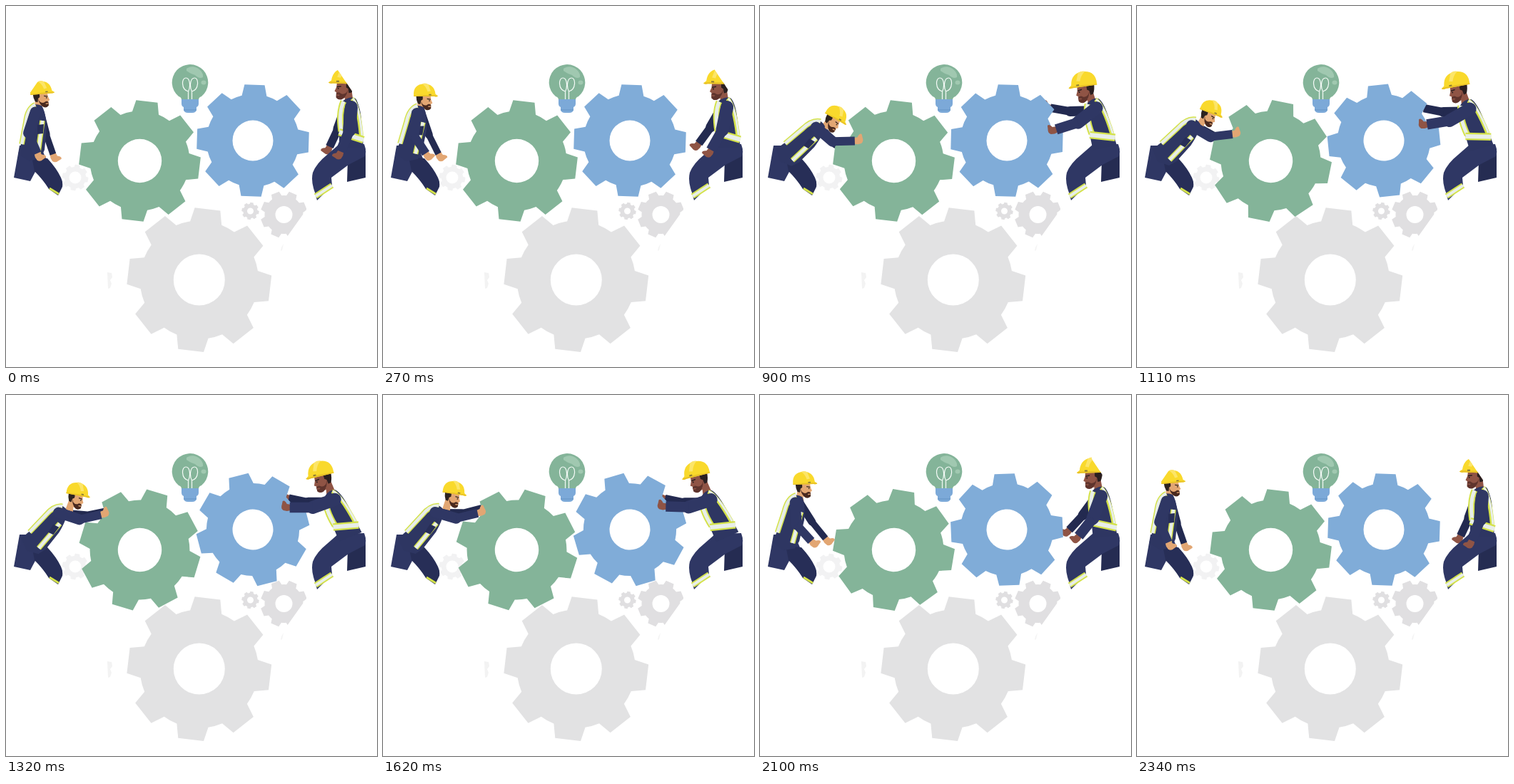
An HTML page for the animation above (2.46 s loop, 520x507 px).

```html
<!DOCTYPE html>
<html lang="en">
<head>
<meta charset="utf-8">
<title>Workers turning gears</title>
<style>
html, body { margin: 0; width: 100%; height: 100%; overflow: hidden; background: #fff; }
svg { display: block; width: 100%; height: 100%; }
.lime { fill: none; stroke: #d4e24a; }
.silver { fill: none; stroke: #e8eee9; }
</style>
</head>
<body>
<svg viewBox="0 0 520 507" xmlns="http://www.w3.org/2000/svg">
  <defs>
    <clipPath id="cutL"><path d="M0 300V180L33 123L46 104V60H200V300Z"/></clipPath>
    <clipPath id="cutR"><path d="M360 60H465V90L490 127L506 175V300H360Z"/></clipPath>
    <clipPath id="cutGear"><path d="M350 255H421V286L394 324V330H350Z"/></clipPath>
  </defs>

  <g id="backGears"></g>
  <path d="M142 374l6 1 1 6-3 4 2 5-2 6-3 1z" fill="#f3f3f3"/>
  <path d="M389 334l-2 9-2 1 1-5z" fill="#f4f4f4"/>
  <g id="farArms"></g>
  <g id="mainGears"></g>

  <g id="bulb">
    <path d="M246 132Q246 128 242 127A25.300 25.300 0 1 1 274 127Q270 128 270 132Z" fill="#84b499"/>
    <path d="M253 88Q262 82 271 89Q277 94 276 100Q271 103 265 97Q258 95 253 91Z" fill="#a0c8b0"/>
    <ellipse cx="277" cy="107.500" rx="3.500" ry="3" fill="#a0c8b0"/>
    <path d="M255.500 132V120C245 117 246 101 252 101C258 101 259 113 255.500 120M260.500 132V120C271 117 270 101 264.500 101C258 101 257 113 260.500 120" fill="none" stroke="#f4faf6" stroke-width="1.200"/>
    <path d="M246 131H270V137Q270 141 267 142V146Q266 150 261 150H255Q250 150 249 146V142Q246 141 246 137Z" fill="#7ca9d8"/>
    <path d="M249 146H267" stroke="#6c9bcb" stroke-width="1.500"/>
  </g>

  <g clip-path="url(#cutL)">
    <path d="M19 196L11 241L34 246L42 231L56 214L48 196Z" fill="#2f3764"/>
    <path d="M36 212L58 214Q71 228 77 241Q80 247 79 254L73 266L60 257Q52 244 40 232Z" fill="#272e57"/>
    <path d="M61 256L74 264" class="lime" stroke-width="3"/>
    <g id="headL"></g>
    <g id="torsoL">
      <path d="M17 208L25 180Q23 152 34 141Q42 136 50 140Q56 149 57 172L54 202L49 213L33 218Z" fill="#2e3662"/>
      <path d="M41 138.500Q30 144 28 162L22 194" class="lime" stroke-width="7.500"/>
      <path d="M41 138.500Q30 144 28 162L22 194" class="silver" stroke-width="4.500"/>
      <path d="M51 161L45 206" class="lime" stroke-width="7.500"/>
      <path d="M51 161L45 206" class="silver" stroke-width="4.500"/>
      <path d="M44 167L53 166L52 179L44 180Z" fill="#272e57"/>
    </g>
    <g id="armL"></g>
  </g>

  <g clip-path="url(#cutR)">
    <path d="M479 215L478 247L504 241V200Z" fill="#252c52"/>
    <path d="M466 195L502 194Q506 204 503 211L480 223L456 241L457 252L436 273L433 262Q427 246 430 234Q435 221 450 209Z" fill="#2f3764"/>
    <path d="M434 267L457 252" class="lime" stroke-width="8"/>
    <path d="M434 267L457 252" class="silver" stroke-width="4"/>
    <g id="headR"></g>
    <g id="torsoR">
      <path d="M467 199V160Q464 140 474 132Q483 126 490 130Q496 137 498 160L501 199Z" fill="#2e3662"/>
      <path d="M473 134Q466 150 470 176" class="lime" stroke-width="9"/>
      <path d="M473 134Q466 150 470 176" class="silver" stroke-width="5"/>
      <path d="M485 130Q494 139 498 182" class="lime" stroke-width="6"/>
      <path d="M486 130Q495 139 499 182" class="silver" stroke-width="3"/>
      <path d="M467 177L501 188" class="lime" stroke-width="10.500"/>
      <path d="M467 177L501 188" class="silver" stroke-width="6"/>
    </g>
    <g id="armR"></g>
  </g>
</svg>

<script>
const NS = 'http://www.w3.org/2000/svg';
const LOOP = 2460, STEP = 30;
const $ = id => document.getElementById(id);
const rad = deg => deg * Math.PI / 180;
const mix = (a, b, p) => a.map((v, i) => v + (b[i] - v) * p);
const ease = x => (1 - Math.cos(Math.PI * Math.min(1, Math.max(0, x)))) / 2;

function add(parent, tag, attrs) {
  const el = document.createElementNS(NS, tag);
  for (const k in attrs) el.setAttribute(k, attrs[k]);
  return parent.appendChild(el);
}

// point at a clockwise angle from straight up
const polar = (r, deg) =>
  (r * Math.sin(rad(deg))).toFixed(2) + ' ' + (-r * Math.cos(rad(deg))).toFixed(2);

function gear(layer, x, y, r, turn, fill, hole) {
  const body = r * .818;
  let d = '';
  for (let i = 0; i < 8; i++) {
    const a = turn + i * 45;
    d += (i ? `A${body} ${body} 0 0 1 ` : 'M') + polar(body, a - 15.5) +
      'L' + polar(r, a - 10.2) + 'L' + polar(r, a + 10.2) + 'L' + polar(body, a + 15.5);
  }
  d += `A${body} ${body} 0 0 1 ${polar(body, turn - 15.5)}Z` +
    `M${-hole} 0a${hole} ${hole} 0 1 0 ${2 * hole} 0a${hole} ${hole} 0 1 0 ${-2 * hole} 0Z`;
  const el = add(layer, 'path', { d, fill, 'fill-rule': 'evenodd' });
  const rotate = deg => el.setAttribute('transform', `translate(${x} ${y}) rotate(${deg})`);
  rotate(0);
  return rotate;
}

const back = $('backGears'), main = $('mainGears');
gear(back, 97, 241, 18.5, 10, '#f2f2f3', 8.5);
gear(back, 342.5, 288, 12.3, 10, '#e0dfe1', 4.5);
gear(add(back, 'g', { 'clip-path': 'url(#cutGear)' }), 389.5, 293, 33, 23, '#e0dfe1', 12);
gear(main, 270.8, 384.6, 101.6, 6.7, '#e2e2e3', 36);
const turnGreen = gear(main, 187.5, 217.5, 85.5, 6.8, '#84b499', 30.7);
const turnBlue = gear(main, 346, 189, 79.6, 1.8, '#80acd8', 28.5);

function drawHead(g, skin, hair, beard) {
  const part = (d, fill) => add(g, 'path', { d, fill });
  part('M-8 1L9 1L9.500 8L12 14L9.500 15.500L9.500 22Q6 26 0 24L-3 23L-2 31L-15 30L-12 12Z', skin);
  part('M-15 1L-4 1L-4 8L-7 10L-8 16L-12 15Q-15 9 -15 1Z', hair);
  part('M-7 10L-5 15Q-1 19 3 17Q6 14 9.500 17L9.500 23Q6 27 1 25Q-6 20 -7 10Z', beard);
  part('M4.500 19L9 18.500L9 20L5.500 20.500Z', skin);
  part('M3 6L9 7L9 8.500L3 7.500Z', hair);
  add(g, 'circle', { cx: 7, cy: 10, r: 1, fill: hair });
  part('M-19 1Q-20 -17 -2 -18Q15 -18 17 -1L21 2Q20 4 15 3L-19 3Z', '#f9d92c');
  part('M-5 -18Q1 -20 5 -17L9 -6L4 -5Q2 -13 -5 -18Z', '#fce568');
  part('M-19 2Q0 0 18 1L21 2Q20 4 15 3L-19 3Z', '#e9c227');
  part('M6 -1L10 -1L10 1L6 1Z', '#8a7a34');
}

function makeArm(layer, upper, fore, color, skin, flip) {
  const g = add(layer, 'g', {});
  const hand = add(g, 'path', { d: 'M-2 -4L4 -5Q7 -11 10 -9L11 -4Q13 1 9 4L4 5L-2 4Z', fill: skin });
  const a = add(g, 'path', { fill: 'none', stroke: color, 'stroke-width': upper, 'stroke-linecap': 'round' });
  const b = add(g, 'path', { fill: 'none', stroke: color, 'stroke-width': fore });
  return (x, y, l1, l2, a1, a2) => {
    const ex = x + l1 * Math.cos(rad(a1)), ey = y + l1 * Math.sin(rad(a1));
    const wx = ex + l2 * Math.cos(rad(a2)), wy = ey + l2 * Math.sin(rad(a2));
    a.setAttribute('d', `M${x} ${y}L${ex} ${ey}`);
    b.setAttribute('d', `M${ex} ${ey}L${wx} ${wy}`);
    hand.setAttribute('transform', `translate(${wx} ${wy}) rotate(${a2}) scale(1 ${flip})`);
  };
}

// pose: torso lean, head x, head y, head tilt, near arm angles, far arm angles
const men = [
  {
    side: 'L', dir: 1, hip: [30, 212], spine: 64, rest: 10, size: .85,
    near: [31, 31], far: [31, 30], farAt: [7, 1], width: [15, 12],
    skin: '#e2a673', hair: '#2d2320', beard: '#49291f',
    poses: [
      [10, 9, -28, -5, 108, 66.6, 75, 71],
      [49.3, 28, -13.5, 30, 41.4, -1.5, 50, 20],
      [42.2, 27, -28, 9, 16, -14, 0, -15]
    ]
  },
  {
    side: 'R', dir: -1, hip: [484, 202], spine: 60, rest: 0, size: 1,
    near: [33, 32], far: [28, 28], farAt: [-9, 4], width: [18, 14.5],
    skin: '#8f5445', hair: '#2a1f20', beard: '#5f342d',
    poses: [
      [0, -11, -36, 2, 95, 112, 110, 115],
      [-11.6, -18.5, -33, -8, 141.4, 161.7, 178.5, 190],
      [-24, -20.6, -36, -14, 162, 182, 180, 192]
    ]
  }
];

for (const m of men) {
  drawHead($('head' + m.side), m.skin, m.hair, m.beard);
  m.farArm = makeArm($('farArms'), m.width[0] - 4, m.width[1] - 3, '#232a50', m.skin, m.dir);
  m.nearArm = makeArm($('arm' + m.side), ...m.width, '#2f3764', m.skin, m.dir);
}

function poseMan(m, from, to, p) {
  const [lean, hx, hy, tilt, n1, n2, f1, f2] = mix(m.poses[from], m.poses[to], p);
  const [x0, y0] = m.hip;
  const x = x0 + m.spine * Math.sin(rad(lean)), y = y0 - m.spine * Math.cos(rad(lean));
  $('torso' + m.side).setAttribute('transform', `rotate(${lean - m.rest} ${x0} ${y0})`);
  $('head' + m.side).setAttribute('transform',
    `translate(${x + hx} ${y + hy}) rotate(${tilt}) scale(${m.size * m.dir} ${m.size})`);
  m.nearArm(x, y, ...m.near, n1, n2);
  m.farArm(x + m.farAt[0], y + m.farAt[1], ...m.far, f1, f2);
}

// stand, reach, push, step back
function phase(t) {
  if (t < 840) return [0, 1, ease((t - 120) / 600)];
  if (t < 1590) return [1, 2, ease((t - 840) / 600)];
  return [2, 0, ease((t - 1590) / 750)];
}

function draw(now) {
  const t = Math.floor((now % LOOP) / STEP) * STEP;
  const [from, to, p] = phase(t);
  const push = to === 2 ? p : from === 2 ? 1 - p : 0;
  turnGreen(11 * push);
  turnBlue(-18.3 * push);
  for (const m of men) poseMan(m, from, to, p);
}

function tick(now) {
  draw(now);
  requestAnimationFrame(tick);
}
draw(0);
requestAnimationFrame(tick);
</script>
</body>
</html>
```
